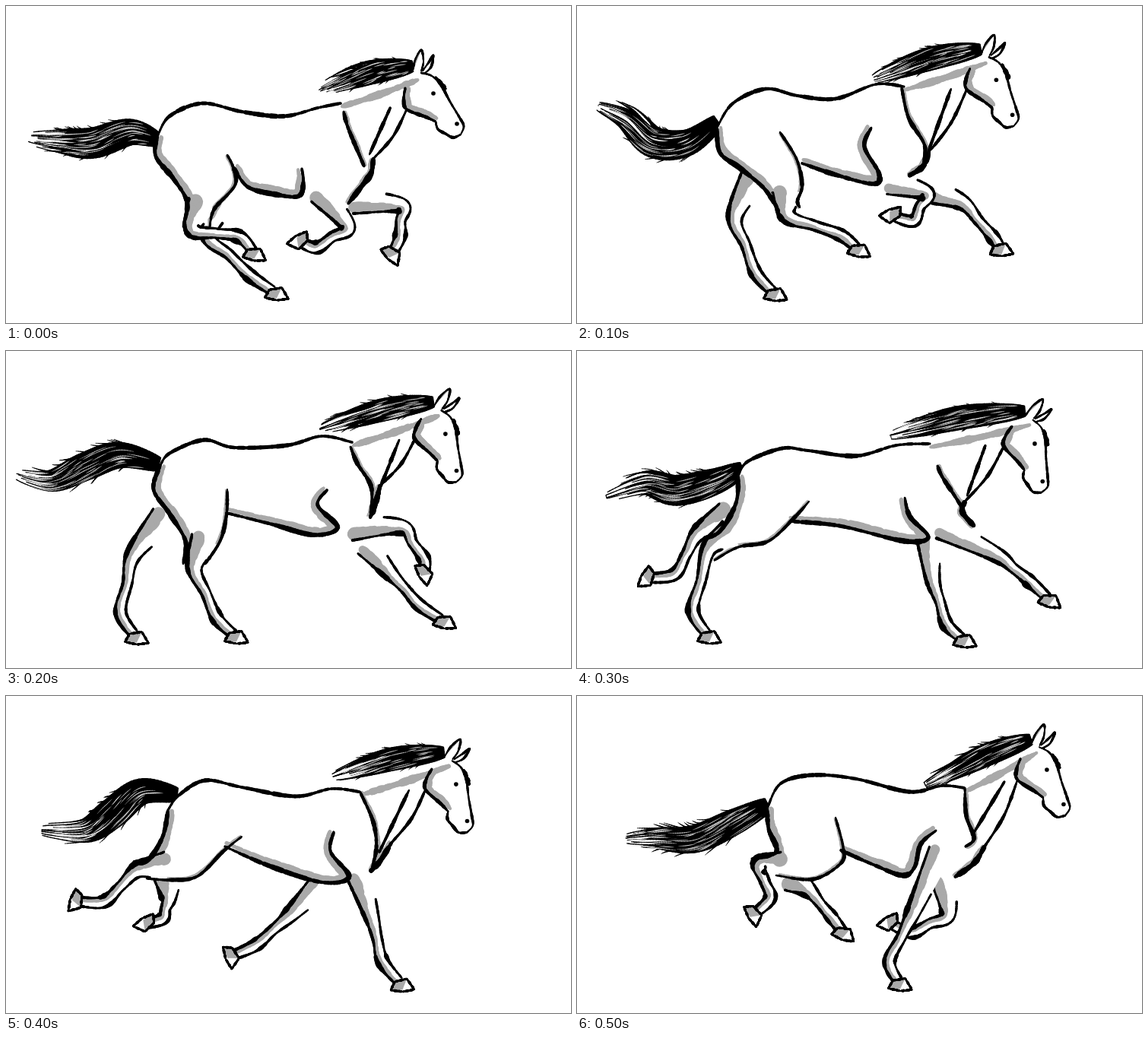
Recreate the animation shown at these times as an HTML page with a canvas. Size 743 by 417 pixels, loop 600 ms.

```html
<!DOCTYPE html>
<html lang="en">
<head>
<meta charset="utf-8">
<title>Galloping horse</title>
<style>
html, body { margin: 0; width: 100%; height: 100%; overflow: hidden; background: #fff; }
canvas { display: block; width: 743px; height: 417px; }
</style>
</head>
<body>
<canvas id="stage" width="743" height="417"></canvas>
<script>
const g = document.getElementById('stage').getContext('2d');
const INK = '#000', GREY = '#a9a9a9', PAPER = '#fff', HOLD = 100;

let seed = 1;
const rnd = () => (seed = seed * 16807 % 2147483647) / 2147483647;
const span = (a, b) => a + (b - a) * rnd();
const mix = (a, b, t) => a + (b - a) * t;
const mid = (a, b, t = .5) => [mix(a[0], b[0], t), mix(a[1], b[1], t)];
const bump = (u, c, s) => Math.exp(-(((u - c) / s) ** 2));
const arch = u => Math.sqrt(Math.max(0, Math.sin(Math.PI * u)));
const pairs = p => Array.from({ length: p.length / 2 }, (_, i) => [p[2 * i], p[2 * i + 1]]);

// Catmull-Rom curve through points; works for any number of coordinates
function at(pts, u) {
  const n = pts.length - 1, s = Math.max(0, Math.min(u * n, n - 1e-6)), i = Math.floor(s), t = s - i;
  const q = j => pts[Math.max(0, Math.min(n, j))];
  return q(i).map((b, k) => {
    const a = q(i - 1)[k], c = q(i + 1)[k], d = q(i + 2)[k];
    return b + t * (c - a + t * (2 * a - 5 * b + 4 * c - d + t * (3 * b - a - 3 * c + d))) / 2;
  });
}

// Point beside the curve; positive offsets lie on the inner side
function beside(pts, u, off) {
  const p = at(pts, u), a = at(pts, u - .01), b = at(pts, u + .01);
  const dx = b[0] - a[0], dy = b[1] - a[1], l = Math.hypot(dx, dy) || 1;
  return [p[0] + dy / l * off, p[1] - dx / l * off];
}

function brush(colour, steps, point, width) {
  g.strokeStyle = colour;
  let a = point(0);
  for (let i = 1; i <= steps; i++) {
    const u = i / steps, b = point(u);
    g.lineWidth = Math.max(.3, width(u));
    g.beginPath(); g.moveTo(...a); g.lineTo(...b); g.stroke();
    a = b;
  }
}

// Dry brush: slow swells plus a ragged edge
function rough(colour, point, width) {
  const ph = rnd() * 6;
  brush(colour, 60, point, u => width(u) * (1 + .18 * Math.sin(u * 17 + ph)) * span(.8, 1.15));
}

const ink = (pts, w) => rough(INK, u => at(pts, u), u => w * mix(.5, 1, arch(u)));
const shade = (pts, w) => rough(GREY, u => beside(pts, u, w / 2), u => w * mix(.3, 1, arch(u)));

function fill(colour, pts) {
  g.fillStyle = colour;
  g.beginPath();
  pts.forEach(p => g.lineTo(...p));
  g.fill();
}
const trace = pts => Array.from({ length: 25 }, (_, i) => at(pts, i / 24));

// Places a shape given around the origin
function place(shape, x, y, deg) {
  const c = Math.cos(deg * Math.PI / 180), s = Math.sin(deg * Math.PI / 180);
  return pairs(shape).map(([a, b]) => [x + a * c - b * s, y + a * s + b * c]);
}

const HOOF = [-15, 7, -10, -4, 6, -8, 16, 6, 1, 9, -15, 7];
const HIND = [38, 19, 12, 14, 11], FORE = [32, 18, 12, 14, 11];

// Limb: hoof angle, then top, middle joint, fetlock and hoof
function leg([deg, ...p], widths) {
  const [top, joint, fetlock, foot] = pairs(p);
  const bones = [top, joint, mid(joint, fetlock), fetlock, foot];
  const girth = widths.map(w => [w / 2]);
  const side = k => u => beside(bones, u, k * at(girth, u)[0]);
  const front = side(1), rear = side(-1), us = Array.from({ length: 25 }, (_, i) => i / 24);
  fill(PAPER, [...us.map(front), ...us.map(rear).reverse()]);
  rough(GREY, u => beside(bones, u, -.5 * at(girth, u)[0]), u => at(girth, u)[0] * .9);
  rough(INK, u => front(mix(.16, .94, u)), u => 3.2 + 2 * bump(u, .72, .06));
  rough(INK, u => rear(u * .95), u => 3.6 + 3 * (bump(u, .27, .07) + bump(u, .78, .06)));
  const hoof = place(HOOF, ...foot, deg);
  fill(PAPER, hoof);
  fill(GREY, [hoof[0], hoof[1], hoof[2], mid(hoof[0], hoof[3])]);
  hoof.slice(1).forEach((b, i) => ink([hoof[i], mid(hoof[i], b), b], 3));
}

// Lock of strands around a spine, ragged at the tip
function hair(spine, size, n) {
  const girth = u => size * (.25 + .75 * Math.sin(Math.PI * Math.min(1, u * .85 + .1)));
  const point = (u, v) => beside(spine, u, v * girth(u));
  for (let j = 0; j < n; j++) {
    const v = j / (n - 1) - .5, end = span(.8, 1.02), bend = span(-.15, .15);
    brush(INK, 50, u => point(u * end, v + bend * u * u),
      u => Math.max(1.3, girth(u * end) / n * 1.8 * Math.min(1, .2 + (1 - u) * 3)));
  }
  for (let j = 0; j < n; j++) {
    const s = j % 3 ? -1 : 1, u0 = span(.1, .7), len = span(.12, .24);
    brush(INK, 14, u => point(u0 + u * len, s * mix(.38, .66, u * u)), u => 3.2 * (1 - u) + .8);
  }
  for (let j = 0; j < n * 4; j++) {
    const v = span(-.46, .46), u0 = span(.08, .85), len = span(.06, .2);
    brush('#eee', 10, u => point(u0 + u * len, v + .06 * u), u => .2 + .6 * Math.sin(Math.PI * u));
  }
}

// Head drawn around the poll
const HEAD = {
  face: [6, 0, 20, 4, 32, 16, 44, 38, 56, 58, 62, 70, 58, 81],
  brow: [25, 6, 33, 15, 38, 21],
  muzzle: [58, 81, 48, 85, 38, 80, 28, 74, 25, 64],
  jaw: [-15, 20, -17, 35, -13, 48, 12, 58, 25, 64],
  ear: [-5, -2, -2, -17, 6, -30, 9, -15, 6, -2],
  farEar: [8, -3, 16, -14, 22, -23, 19, -8, 10, 1]
};

function head([x, y, deg]) {
  const part = k => place(HEAD[k], x, y, deg);
  shade(part('jaw'), 9);
  ink(part('face'), 3.2); ink(part('brow'), 5); ink(part('muzzle'), 3.6); ink(part('jaw'), 4.5);
  const ear = part('ear');
  fill(PAPER, ear);
  fill(GREY, ear.slice(0, 3));
  ink(ear, 2.8); ink(part('farEar'), 3);
  for (const [px, py] of place([22, 27, 53, 67], x, y, deg)) {
    g.fillStyle = INK;
    g.beginPath(); g.arc(px, py, 2.8, 0, 7); g.fill();
  }
}

// Ink and shade widths of the body outline
const LINES = { back: [5, 0], rump: [6, 10], flank: [4.5, 4], belly: [6, 10], shoulder: [5, 5], chest: [7, 6] };

function horse(pose) {
  const line = {};
  for (const k in LINES) line[k] = pairs(pose[k]);
  const { back, rump, flank, belly, shoulder, chest } = line;
  const [x, y, deg] = pose.head, withers = back[0], low = chest[chest.length - 1];
  const jaw = place([-13, 48], x, y, deg)[0], bow = mid(low, jaw);
  const throat = [low, [bow[0] + 4, bow[1] + 3], jaw];
  const nape = mid(withers, [x, y]), crest = [[x, y + 5], [nape[0], nape[1] + 4], withers];
  const fold = mid(jaw, withers, .25), root = shoulder[shoulder.length - 1];
  const tip = pose.mane, lift = mid([x, y], tip);

  leg(pose.farHind, HIND);
  leg(pose.farFore, FORE);
  hair(pairs(pose.tail), 36, 15);
  fill(PAPER, [back, rump, flank, belly.slice(0, 4), chest, throat].flatMap(trace).concat([[x, y]]));
  for (const k in LINES) if (LINES[k][1]) shade(line[k], LINES[k][1]);
  shade(crest, 9);
  leg(pose.hind, HIND);
  leg(pose.fore, FORE);
  for (const k in LINES) ink(line[k], LINES[k][0]);
  ink(throat, 4);
  ink([fold, mid(fold, root, .4), mid(fold, root, .8)], 4.5);
  hair([[x - 5, y - 9], [lift[0], lift[1] - 11], tip], 27, 12);
  head(pose.head);
}

const poses = [
  {
    head: [540, 88, 0], mane: [412, 112], tail: [199, 176, 163, 166, 115, 180, 75, 178, 30, 174],
    back: [440, 128, 410, 134, 365, 145, 310, 139, 258, 128, 215, 145, 199, 172],
    rump: [199, 172, 197, 198, 220, 227, 238, 258, 233, 290],
    flank: [268, 290, 274, 267, 301, 236, 299, 213, 291, 196],
    belly: [300, 213, 318, 238, 355, 248, 385, 250, 391, 232, 389, 214],
    shoulder: [444, 139, 449, 158, 463, 192, 471, 211], chest: [450, 260, 467, 238, 480, 220, 483, 201],
    hind: [10, 258, 260, 246, 294, 308, 304, 327, 326], farHind: [5, 294, 245, 266, 300, 322, 355, 356, 378],
    fore: [150, 414, 247, 450, 290, 408, 318, 386, 310], farFore: [45, 458, 257, 520, 262, 518, 304, 508, 326]
  },
  {
    head: [536, 66, 13], mane: [390, 96], tail: [185, 152, 145, 180, 100, 180, 65, 148, 28, 131],
    back: [430, 106, 393, 103, 340, 122, 290, 118, 248, 109, 205, 128, 184, 160],
    rump: [184, 160, 188, 193, 214, 213, 246, 240, 266, 270],
    flank: [293, 265, 290, 256, 296, 236, 289, 202, 267, 166],
    belly: [296, 207, 340, 222, 390, 234, 397, 220, 378, 185, 387, 160],
    shoulder: [427, 108, 436, 147, 457, 183, 455, 211], chest: [437, 223, 455, 211, 463, 192],
    hind: [10, 276, 245, 278, 276, 348, 302, 371, 321], farHind: [5, 234, 225, 208, 277, 236, 352, 261, 379],
    fore: [160, 412, 232, 460, 246, 442, 283, 414, 276], farFore: [0, 470, 244, 508, 259, 548, 305, 558, 320]
  },
  {
    head: [567, 76, 21], mane: [413, 103], tail: [201, 149, 150, 137, 105, 152, 60, 170, 14, 162],
    back: [455, 120, 415, 112, 370, 124, 300, 127, 260, 117, 216, 134, 203, 150],
    rump: [203, 150, 194, 182, 215, 214, 236, 250, 233, 280],
    flank: [262, 280, 282, 249, 290, 215, 291, 182],
    belly: [290, 213, 350, 228, 405, 242, 436, 232, 410, 203, 422, 183],
    shoulder: [453, 126, 462, 148, 480, 178, 480, 210], chest: [479, 219, 486, 200, 492, 177],
    hind: [5, 262, 248, 248, 285, 278, 352, 303, 376], farHind: [5, 208, 220, 168, 268, 151, 345, 172, 377],
    fore: [60, 455, 233, 520, 231, 550, 274, 551, 292], farFore: [10, 475, 256, 504, 290, 545, 335, 577, 356]
  },
  {
    head: [594, 88, 26], mane: [412, 111], tail: [218, 155, 180, 172, 130, 183, 90, 173, 38, 190],
    back: [464, 122, 420, 124, 367, 138, 304, 131, 270, 128, 225, 145, 212, 164],
    rump: [212, 164, 209, 200, 188, 237, 167, 246],
    flank: [181, 275, 212, 258, 252, 250, 285, 220, 305, 198],
    belly: [280, 224, 345, 230, 430, 250, 462, 245, 438, 218, 431, 193],
    shoulder: [474, 151, 480, 165, 495, 188, 507, 207], chest: [522, 230, 507, 212, 510, 198],
    hind: [5, 202, 240, 174, 260, 153, 343, 174, 376], farHind: [120, 197, 217, 160, 240, 128, 294, 93, 299],
    fore: [15, 480, 232, 552, 268, 597, 304, 622, 328], farFore: [5, 463, 248, 468, 300, 487, 360, 510, 381]
  },
  {
    head: [581, 83, 21], mane: [430, 106], tail: [225, 130, 178, 126, 140, 155, 105, 178, 47, 177],
    back: [465, 126, 428, 122, 380, 132, 310, 120, 262, 111, 228, 130, 213, 150],
    rump: [213, 150, 206, 185, 186, 217, 168, 218],
    flank: [185, 240, 218, 242, 252, 237, 285, 205, 310, 185],
    belly: [288, 198, 345, 223, 415, 245, 451, 238, 427, 205, 431, 179],
    shoulder: [466, 127, 483, 166, 487, 200, 481, 226], chest: [480, 230, 492, 217, 507, 193],
    hind: [110, 210, 224, 174, 229, 128, 271, 93, 270], farHind: [150, 213, 238, 214, 266, 206, 293, 184, 300],
    fore: [0, 465, 238, 481, 290, 496, 350, 521, 380], farFore: [70, 414, 248, 374, 288, 328, 328, 297, 342]
  },
  {
    head: [602, 66, 12], mane: [458, 117], tail: [251, 143, 208, 165, 155, 188, 105, 187, 63, 189],
    back: [510, 121, 480, 118, 437, 126, 367, 109, 310, 104, 268, 115, 250, 148],
    rump: [250, 148, 252, 175, 262, 205, 230, 214],
    flank: [262, 236, 311, 241, 347, 220, 350, 199, 340, 160],
    belly: [347, 203, 390, 222, 428, 236, 444, 225, 452, 195, 472, 177],
    shoulder: [510, 122, 512, 158, 522, 187, 511, 198], chest: [497, 238, 522, 220, 536, 198],
    hind: [60, 266, 224, 240, 222, 254, 266, 233, 287], farHind: [20, 285, 240, 305, 255, 336, 292, 351, 312],
    fore: [5, 478, 205, 442, 285, 411, 350, 425, 379], farFore: [150, 482, 243, 488, 288, 440, 311, 411, 299]
  }
];

g.lineCap = g.lineJoin = 'round';
const start = performance.now();
let shown = -1;
function tick() {
  const i = Math.floor((performance.now() - start) / HOLD) % poses.length;
  if (i !== shown) {
    shown = i;
    seed = 4321 + i * 977;
    g.fillStyle = PAPER;
    g.fillRect(0, 0, 743, 417);
    horse(poses[i]);
  }
  requestAnimationFrame(tick);
}
tick();
</script>
</body>
</html>
```
